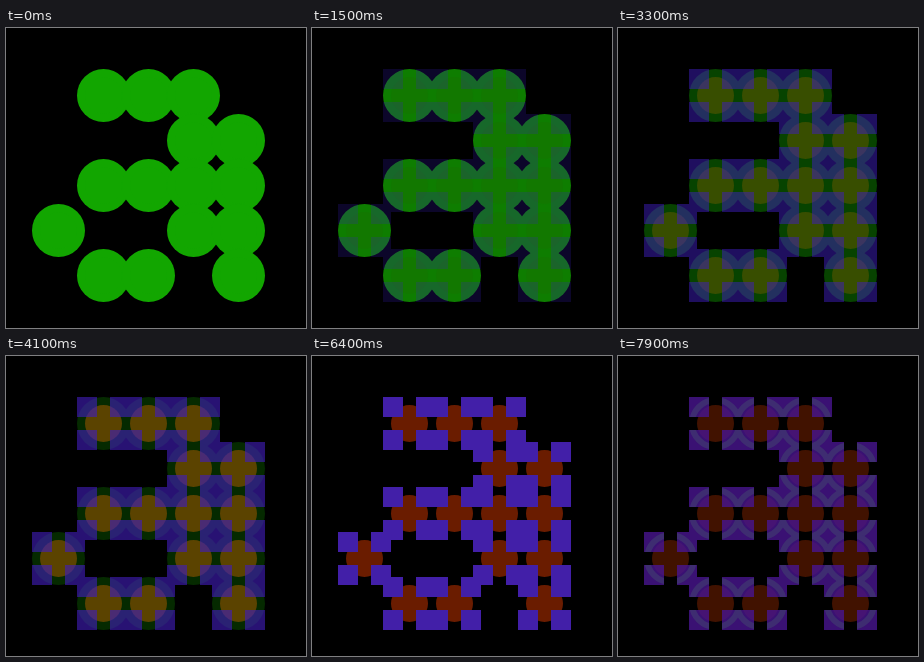
Write an HTML page that moves like this. It is 300 px wide and 300 px high and loops after 8000 ms.

```html
<!DOCTYPE html>
<html lang="en">
<head>
<meta charset="utf-8">
<title>Dot letter</title>
<style>
html, body { margin: 0; width: 100%; height: 100%; overflow: hidden; background: #000; }
svg { display: block; width: 100%; height: 100%; }
</style>
</head>
<body>
<svg viewBox="0 0 300 300">
  <defs><clipPath id="corners"></clipPath></defs>
  <g id="big"></g>
  <g id="small"></g>
  <g id="squares"></g>
  <g clip-path="url(#corners)"><g id="rings" fill="none" stroke="#424470" stroke-width="6"></g></g>
</svg>
<script>
const LOOP = 8000, STEP = 100, HOLD = 300, START = 200, PEAK = 6400;
const ROWS = [' ###', '   ##', ' ####', '#  ##', ' ## #'];
const GREEN = [18, 166, 0];
const PURPLES = [[60, 28, 210], [66, 31, 168], [72, 20, 140]];
// Small disc colours, evenly spaced over the loop
const DISC = [GREEN, [18, 117, 0], [52, 79, 0], [122, 57, 0], [106, 28, 0], [62, 17, 0]];

const $ = id => document.getElementById(id);

function add(id, tag, attrs) {
  const el = document.createElementNS('http://www.w3.org/2000/svg', tag);
  for (const k in attrs) el.setAttribute(k, attrs[k]);
  $(id).appendChild(el);
}

ROWS.forEach((row, j) => [...row].forEach((c, i) => {
  if (c !== '#') return;
  const cx = 52.5 + 45 * i, cy = 67.5 + 45 * j;
  add('big', 'circle', { cx, cy, r: 26.5 });
  add('small', 'circle', { cx, cy, r: 18.5 });
  add('rings', 'circle', { cx, cy, r: 23.5 });
  for (const dx of [-26.5, 6.5]) for (const dy of [-26.5, 6.5])
    for (const id of ['squares', 'corners'])
      add(id, 'rect', { x: Math.floor(cx + dx), y: Math.floor(cy + dy), width: 20, height: 20 });
}));

const ramp = (t, from, to) => Math.min(1, Math.max(0, (t - from) / (to - from)));

// Colour at position p (0 to 1) along evenly spaced stops
function blend(stops, p) {
  const x = p * (stops.length - 1), i = Math.min(stops.length - 2, Math.floor(x));
  return `rgb(${stops[i].map((v, k) => Math.round(v + (stops[i + 1][k] - v) * (x - i)))})`;
}

function draw(time) {
  const t = time < HOLD ? START : Math.floor(time / STEP) * STEP;
  const rise = ramp(t, START, PEAK), fall = ramp(t, PEAK, LOOP);
  $('big').setAttribute('fill', blend([GREEN, [0, 0, 0]], ramp(t, START, 5400)));
  $('small').setAttribute('fill', t > START ? blend(DISC, t / LOOP) : blend(DISC, 0));
  $('squares').setAttribute('fill', blend(PURPLES, (rise + fall) / 2));
  $('squares').setAttribute('opacity', rise - 0.2 * fall);
  $('rings').setAttribute('opacity', 0.6 * fall);
}

const start = performance.now();
function tick() {
  draw((performance.now() - start) % LOOP);
  requestAnimationFrame(tick);
}
draw(0);
requestAnimationFrame(tick);
</script>
</body>
</html>
```
